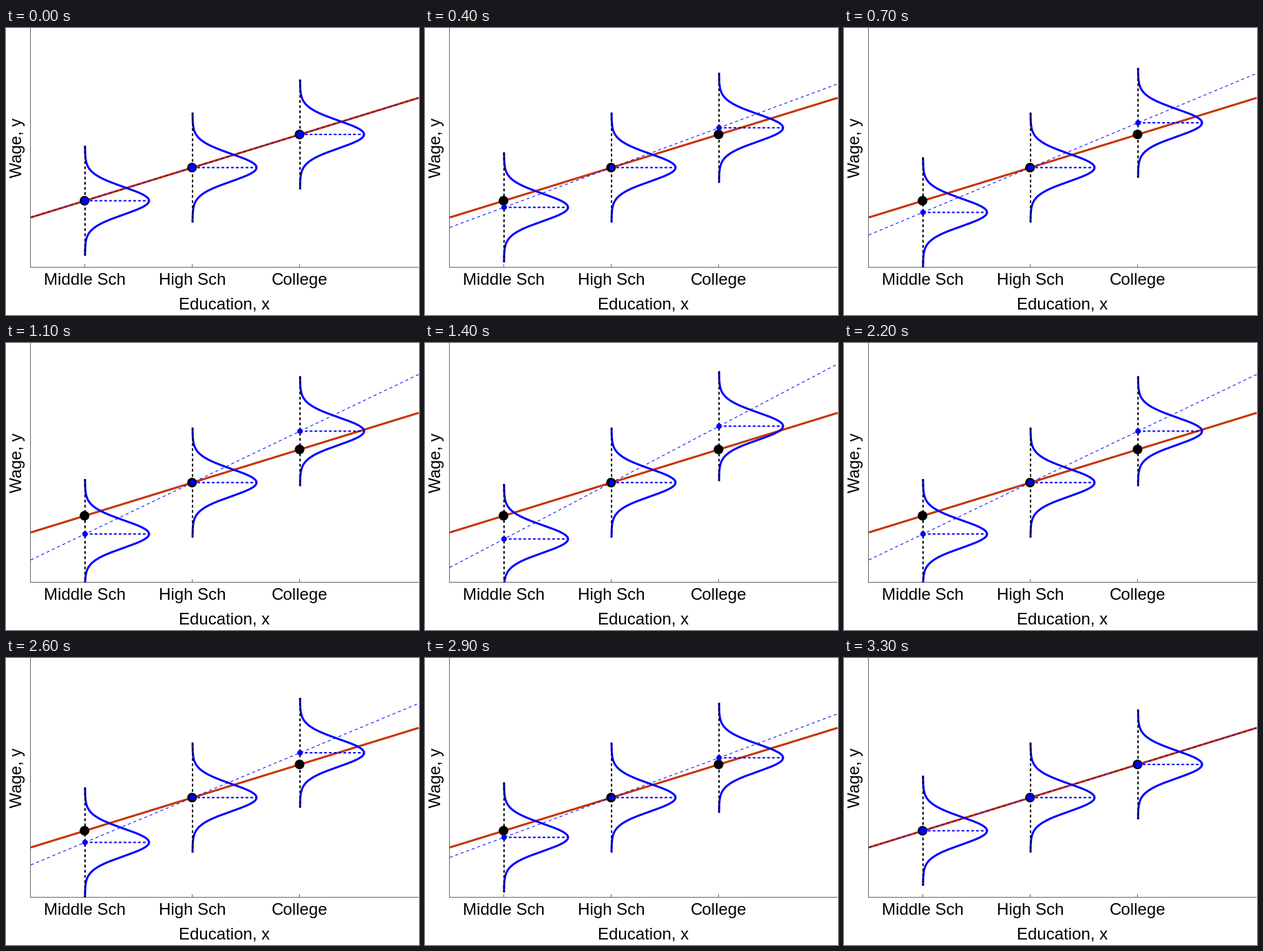
Recreate the animation shown at these times as a matplotlib script. Size 600 by 418 pixels, loop 3.4 s.

```python
import numpy as np
import matplotlib.pyplot as plt
from matplotlib.animation import FuncAnimation
from matplotlib.patches import Circle, Rectangle

W, H, DPI = 600, 418, 64
PT = 72 / DPI  # points per pixel
FRAMES, STEP_MS = 34, 100

BLUE, RED, GREY = "#0000ff", "#c83200", "#666666"
LEVELS = [(114.8, "Middle Sch"), (271, "High Sch"), (427.2, "College")]
PIVOT = (271, 203.3)
SLOPE = -0.3091
TILT = 2.42 / 156.2  # slope gained per step
SIGMA, HEIGHT = 20, 93

plt.rcParams["font.family"] = "Liberation Sans"
plt.rcParams["text.hinting"] = "native"
plt.rcParams["lines.scale_dashes"] = False

fig = plt.figure(figsize=(W / DPI, H / DPI), dpi=DPI, facecolor="white")
ax = fig.add_axes([0, 0, 1, 1])
ax.set_xlim(0, W)
ax.set_ylim(H, 0)
ax.axis("off")

plot_area = Rectangle((36, 0), 563.5, 348.5, transform=ax.transData)


def line(xs, ys, color, width, dash=None, z=2, clip=True):
    style = (0, tuple(d * PT for d in dash)) if dash else "-"
    art, = ax.plot(xs, ys, color=color, lw=width * PT, ls=style, zorder=z,
                   solid_capstyle="butt", dash_capstyle="butt", snap=False)
    if clip:
        art.set_clip_path(plot_area)
    return art


def dot(x, y, r, color, z):
    return ax.add_patch(Circle((x, y), r, fc=color, ec="none", zorder=z))


def label(x, y, s, **kw):
    ax.text(x, y, s, fontsize=24 * PT, ha="center", va="baseline", **kw)


def fit(x, slope):
    return PIVOT[1] + slope * (x - PIVOT[0])


# Axes and labels
line([35.5, 35.5], [0, 349], GREY, 1, clip=False)
line([35, 599.5], [348.5, 348.5], GREY, 1, clip=False)
for x, name in LEVELS:
    line([np.floor(x - 0.5) + 0.5] * 2, [344, 348.5], GREY, 1, clip=False)
    label(x - 0.6, 374, name)
label(317, 410, "Education, x")
label(23, 174.5, "Wage, y", rotation=90, rotation_mode="anchor")

# Fixed regression line and its points
ends = np.array([36, 599.5])
line(ends, fit(ends, SLOPE), RED, 3, z=3)
for x, _ in LEVELS:
    dot(x - 0.7, fit(x, SLOPE), 7, "black", 4)

# Moving line with its bell curves
tilted = line(ends, fit(ends, SLOPE), BLUE, 1, (4.5, 4), z=5)
d = np.linspace(-4 * SIGMA, 4 * SIGMA, 161)
bell = HEIGHT * np.exp(-d**2 / (2 * SIGMA**2))
groups = []
for x, _ in LEVELS:
    curve = line(x + bell, d, BLUE, 3, z=6)
    spine = line([x, x], [0, 0], "black", 2, (4, 3.5), z=7)
    peak = line([x, x + HEIGHT], [0, 0], BLUE, 2, (4, 3), z=8)
    groups.append((x, spine, peak, curve, dot(x, 0, 4, BLUE, 9)))


def update(n):
    k = min(n, FRAMES - 1 - n)
    slope = SLOPE - k * TILT
    tilted.set_ydata(fit(ends, slope))
    for x, spine, peak, curve, mark in groups:
        y = fit(x, slope)
        spine.set_ydata([y - 4 * SIGMA, y + 4 * SIGMA])
        peak.set_ydata([y, y])
        curve.set_ydata(y + d)
        mark.center = (x, y)
        mark.set_radius(4 if k else 5.3)
    return []


anim = FuncAnimation(fig, update, frames=FRAMES, interval=STEP_MS,
                     repeat=True, repeat_delay=0, blit=False)
plt.show()
```
